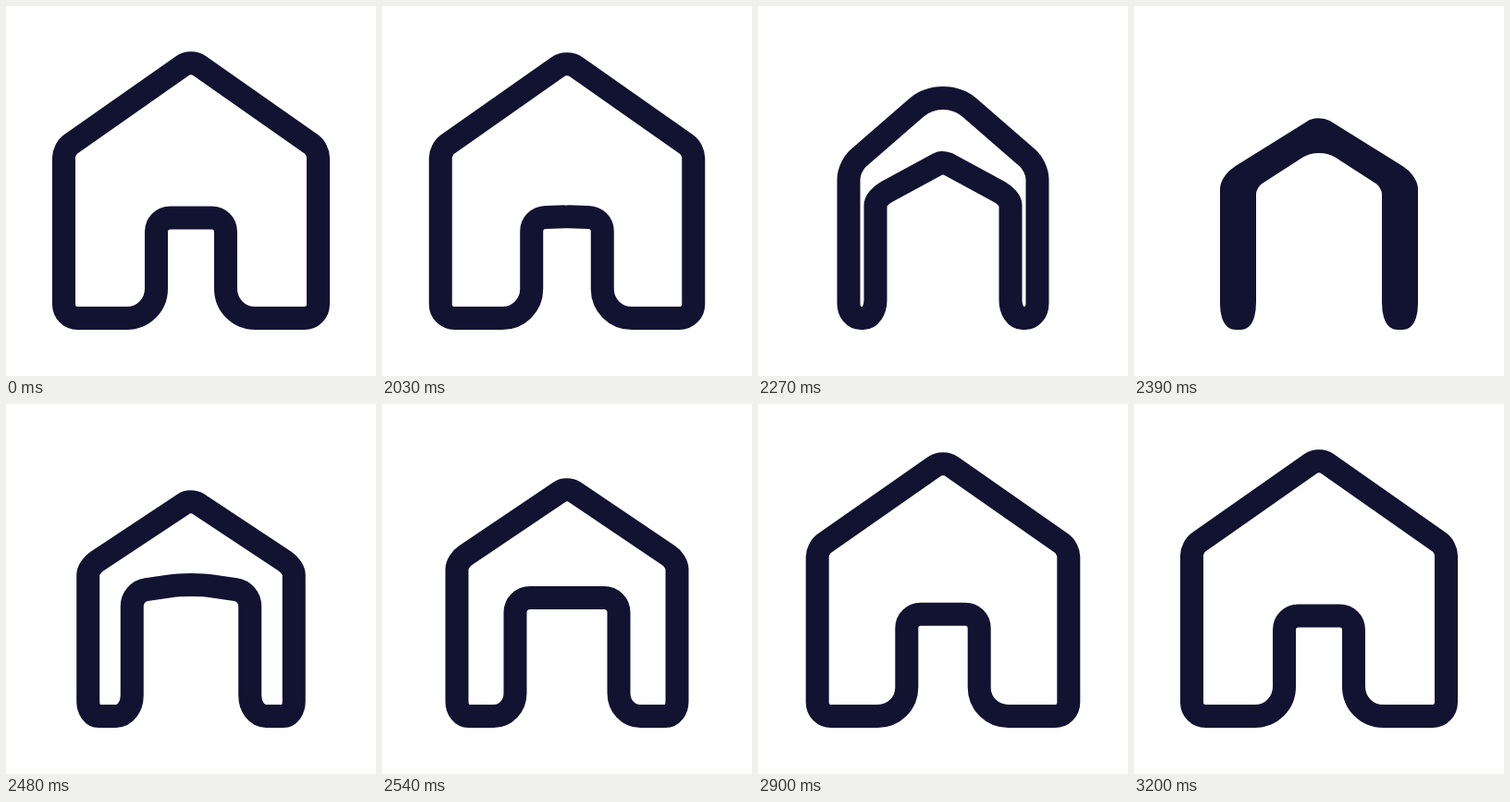
An HTML page with a canvas that plays this animation: 400x400 px, repeating every 3230 ms.

```html
<!DOCTYPE html>
<html lang="en">
<head>
<meta charset="utf-8">
<title>Home icon</title>
<style>
  html, body { margin: 0; width: 100%; height: 100%; overflow: hidden; background: #fff; }
  canvas { display: block; width: 400px; height: 400px; }
</style>
</head>
<body>
<canvas id="stage" width="400" height="400"></canvas>
<script>
const ctx = document.getElementById('stage').getContext('2d');

const LOOP = 3230, STEP = 30, STEP_OFFSET = 20;
const CENTER = 200, FLOOR = 337.5, ROUNDNESS = 0.56;

// Morph progress over time: steady run, then a soft landing
const TIMES = [0, 2000, 2270, 2390, 2540, 2900, 3100, LOOP];
const PROGRESS = [0, 0, 0.355, 0.57, 0.815, 0.983, 1, 1];

// Shape of the sinking arch over morph progress
const POSES = [0, 0.355, 0.57, 0.815, 1];
const SHOULDER = [154.5, 173.5, 189.5, 209.5, 229];
const RISE = [96.3, 88.5, 52.3, 0, 0];
const PEAK_HALF = [9, 29, 24.6, 24, 22];
const CORNER = [9.3, 14, 14, 16, 15];
// Bottom corner widths as fractions of the gap between the two arches
const FOOT_SINKING = [0.15, 0.45, 0.35, 0.37, 0.32];
const FOOT_RISING = [0.32, 0.45, 0.35, 0.2, 0.15];

const mix = (a, b, p) => a + (b - a) * p;

// Monotone cubic interpolation
function keyed(keys, values, x) {
  const last = keys.length - 1;
  const slope = i => (values[i + 1] - values[i]) / (keys[i + 1] - keys[i]);
  const tangent = i => {
    if (i === 0) return slope(0);
    if (i === last) return slope(last - 1);
    const a = slope(i - 1), b = slope(i);
    return a * b > 0 ? 2 * a * b / (a + b) : 0;
  };
  let i = 0;
  while (i < last - 1 && x > keys[i + 1]) i++;
  const d = keys[i + 1] - keys[i], s = (x - keys[i]) / d, r = 1 - s;
  return r * r * (1 + 2 * s) * values[i] + s * r * r * d * tangent(i)
    + s * s * (3 - 2 * s) * values[i + 1] - s * s * r * d * tangent(i + 1);
}

// Left half of an arch: wall top, shoulder, roof start, roof end, peak
function archPoints(wall, shoulder, rise, peakHalf, corner) {
  const pitch = rise / (CENTER - wall);
  const run = corner / Math.hypot(1, pitch);
  const peak = shoulder - rise;
  return [
    [wall, shoulder + corner],
    [wall, shoulder],
    [wall + run, shoulder - pitch * run],
    [CENTER - peakHalf, peak + pitch * peakHalf],
    [CENTER, peak]
  ];
}

const DOOR = archPoints(162.5, 229, 0, 0, 15);
const HOUSE = archPoints(62.5, 154.5, 96.3, 9, 9.3);

function risingPoints(p) {
  const points = DOOR.map((a, i) => a.map((v, axis) => mix(v, HOUSE[i][axis], p)));
  const [, shoulder, start, end, peak] = points;
  end[0] -= 2.5 * (1 - p);
  peak[0] -= 2.5 * (1 - p);
  // Keep the shoulder tangent to the roof
  const pitch = (start[1] - end[1]) / (end[0] - start[0]);
  shoulder[1] = start[1] + pitch * (start[0] - shoulder[0]);
  return points;
}

function sinkingPoints(p) {
  const pose = values => keyed(POSES, values, p);
  return archPoints(mix(62.5, 162.5, p), pose(SHOULDER), pose(RISE), pose(PEAK_HALF), pose(CORNER));
}

function roundCorner(from, ctrl, to) {
  const pull = a => a.map((v, axis) => mix(v, ctrl[axis], ROUNDNESS));
  ctx.lineTo(...from);
  ctx.bezierCurveTo(...pull(from), ...pull(to), ...to);
}

function addArch(points, footWidth, footHeight, fromLeft) {
  const [wallTop, shoulder, roofStart, roofEnd, peak] = points;
  const wall = wallTop[0];
  const footEnd = [wall + footWidth, FLOOR];
  const footCorner = [wall, FLOOR];
  const wallEnd = [wall, FLOOR - footHeight];
  const same = a => a;
  const flip = ([x, y]) => [2 * CENTER - x, y];
  const [near, far] = fromLeft ? [same, flip] : [flip, same];

  roundCorner(near(footEnd), near(footCorner), near(wallEnd));
  roundCorner(near(wallTop), near(shoulder), near(roofStart));
  roundCorner(near(roofEnd), peak, far(roofEnd));
  roundCorner(far(roofStart), far(shoulder), far(wallTop));
  roundCorner(far(wallEnd), far(footCorner), far(footEnd));
}

function draw(time) {
  const t = Math.max(0, Math.floor((time - STEP_OFFSET) / STEP) * STEP + STEP_OFFSET);
  const p = keyed(TIMES, PROGRESS, t);
  const gap = mix(100, -100, p);
  const squash = mix(0.65, 1, Math.abs(gap) / 100);

  ctx.fillStyle = '#fff';
  ctx.fillRect(0, 0, 400, 400);
  ctx.strokeStyle = '#121331';
  ctx.lineWidth = 25;
  ctx.lineJoin = 'round';
  ctx.beginPath();
  addArch(sinkingPoints(p), keyed(POSES, FOOT_SINKING, p) * gap, mix(15, 32, p) * squash, true);
  addArch(risingPoints(p), -keyed(POSES, FOOT_RISING, p) * gap, mix(32, 15, p) * squash, false);
  ctx.closePath();
  ctx.stroke();
}

const origin = performance.now();
function tick() {
  draw((performance.now() - origin) % LOOP);
  requestAnimationFrame(tick);
}
tick();
</script>
</body>
</html>
```
